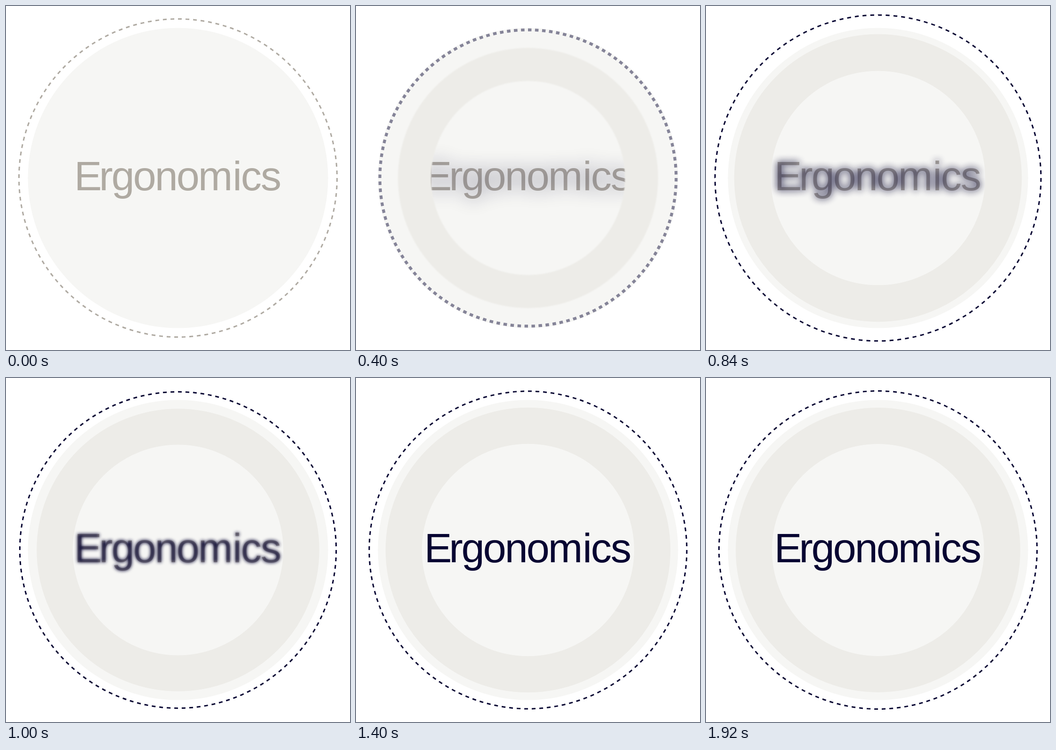
An HTML page for the animation above (1960 ms loop, 730 px wide and 730 px high).

```html
<!DOCTYPE html>
<html lang="en">
<head>
<meta charset="utf-8">
<title>Ergonomics</title>
<style>
  html, body { margin: 0; width: 100%; height: 100%; overflow: hidden; background: #fff; }
  svg { display: block; width: 100vw; height: 100vh; }
  text { font: 88px "Liberation Sans", Arial, sans-serif; letter-spacing: -3px; }
  circle { fill: none; }
</style>
</head>
<body>
<svg viewBox="0 0 730 730">
  <circle cx="365" cy="365" r="318.5" style="fill:#f6f6f4"/>
  <text x="144.8" y="391" dx="0 -3 0 0 0 0 0 3 1 1" fill="#afaaa2">Ergonomics</text>
  <text id="label" x="144.8" y="391" dx="0 -3 0 0 0 0 0 3 1 1" fill="#070532">Ergonomics</text>
  <circle id="ring" cx="365" cy="365" stroke="#edece8"/>
  <circle id="dashes" cx="365" cy="365" pathLength="264" stroke-dasharray="1 1"/>
</svg>
<script>
  const LOOP = 1960, STEP = 40, START = 240;
  const [label, ring, dashes] = ["label", "ring", "dashes"].map(id => document.getElementById(id));

  const progress = (t, from, duration) => Math.min(1, Math.max(0, (t - from) / duration));

  // Damped oscillation around 1, first crossing it at time `zero`.
  const spring = (t, zero, amplitude, damping, speed) =>
    1 + amplitude * Math.exp(-damping * (t - zero)) * Math.sin(speed * (t - zero));

  const setCircle = (el, radius, width) => {
    el.setAttribute("r", radius);
    el.setAttribute("stroke-width", width);
  };
  const setLook = (el, opacity, blur) => {
    el.style.opacity = opacity;
    el.style.filter = blur > 0 ? `blur(${blur}px)` : "none";
  };

  function draw(t) {
    const active = t >= START;
    dashes.setAttribute("stroke", active ? "#070532" : "#afaaa2");
    if (!active) {
      setLook(label, 0, 0);
      setLook(ring, 0, 0);
      setLook(dashes, 1, 0);
      setCircle(dashes, 337.5, 3);
      return;
    }

    const entry = progress(t, START, 340);
    const softness = 1.6 * (1 - entry);

    const ringScale = spring(t, 475, 0.118, 0.0045, 0.0073);
    setCircle(ring, 263.5 * ringScale, 77 * ringScale);
    setLook(ring, progress(t, 200, 160), softness);

    setCircle(dashes, 337.5 * spring(t, 485, 0.1, 0.003, 0.0066), 3 + 6 * (1 - entry));
    setLook(dashes, entry, softness / 2);

    const focus = progress(t, START, 900);
    setLook(label, 1 - (1 - focus) ** 2.8, 24 * (1 - focus));
  }

  function frame() {
    const t = performance.now() % LOOP;
    draw(Math.floor(t / STEP) * STEP);
    requestAnimationFrame(frame);
  }
  frame();
</script>
</body>
</html>
```
